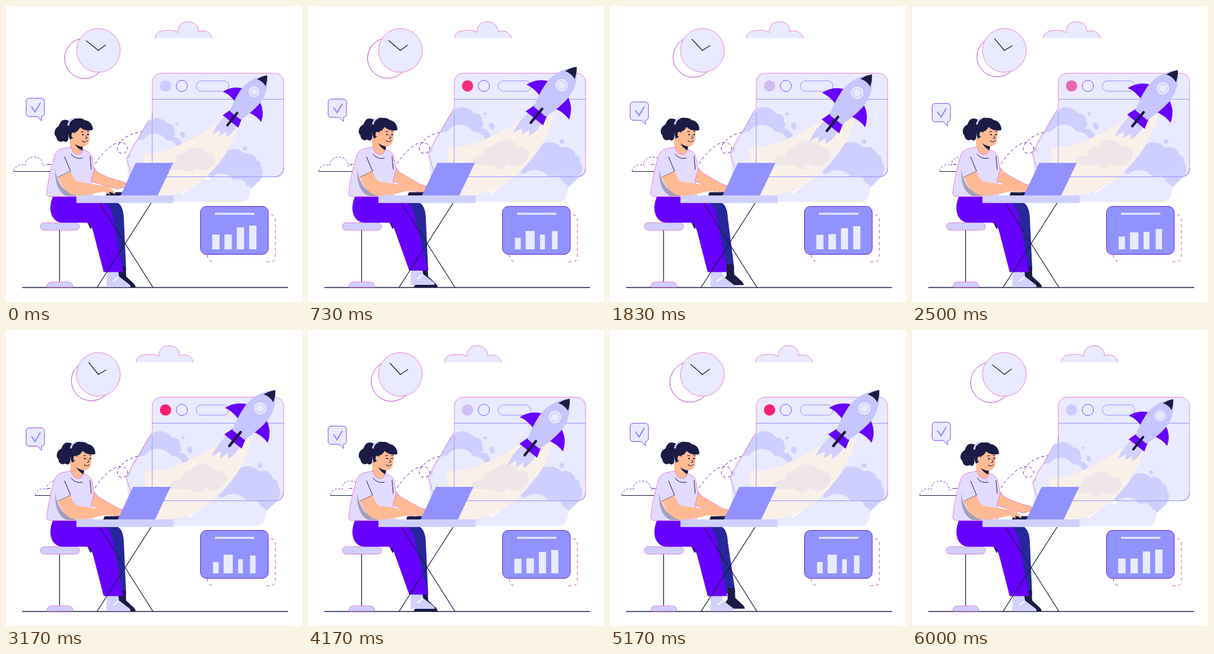
Animation, 500 px wide and 500 px high, one loop 6030 ms. Source, as an HTML page:

```html
<!DOCTYPE html>
<html lang="en">
<head>
<meta charset="utf-8">
<title>Launch day</title>
<style>
html, body { margin: 0; width: 100%; height: 100%; overflow: hidden; background: #fff; }
svg { display: block; width: 100vw; height: 100vh; }
.pale { fill: #e9e9ff; }
.lilac { fill: #cfcfff; }
.violet { fill: #6600ff; }
.navy { fill: #1b1b45; }
.skin { fill: #ffba93; }
.shirt { fill: #e3daff; }
.edge { stroke: #e868c4; stroke-width: .8; }
.line { fill: none; stroke: #9393ff; }
.ink { fill: none; stroke: #1b1b45; stroke-width: 1.3; stroke-linecap: round; stroke-linejoin: round; }
.thin { stroke-width: 1; }
.dash { fill: none; stroke: #6a1fb0; stroke-dasharray: 5 4; }
</style>
</head>
<body>
<svg viewBox="0 0 500 500">
  <defs>
    <path id="cloud" d="M0 28C0 20 6 15 18 15Q30 13 38 18C38 6 45 0 56 0C67 0 74 8 73 17C85 12 95 20 96 28"/>
    <path id="fin" class="violet" d="M20 48Q40 57 46.500 77Q33 73 15 78Z"/>
  </defs>

  <!-- sky -->
  <use id="skyCloud" href="#cloud" class="pale edge"/>
  <circle id="clockBack" r="34" fill="#fff" stroke="#b02ad0" stroke-width=".9"/>
  <circle cx="156" cy="75" r="37" class="pale edge"/>
  <path id="longHand" class="ink" d="M156 75L136 59"/>
  <path id="shortHand" class="ink" d="M156 75L168 66"/>
  <g id="bubble">
    <path class="pale" stroke="#8a3cf0" d="M40 0H59Q65 0 65 6V25Q65 30 60 31V38L53 31H40Q34 31 34 25V6Q34 0 40 0Z"/>
    <path d="M43 14L49 23L58 8" fill="none" stroke="#9292ff" stroke-width="2.2"/>
  </g>
  <g id="lowCloud">
    <use href="#cloud" transform="translate(82 0) scale(-.855 .86)" fill="#fff" stroke="#6a1fb0" stroke-dasharray="4 3"/>
    <path class="ink thin" d="M0 24.500H82"/>
  </g>
  <path class="dash" d="M70 267.500H150Q158 254 170 243C180 233 190 229 198 231C209 236 207 248 197 249C187 249 185 239 193 230C203 219 214 214 236 211"/>

  <!-- browser window, smoke and rocket -->
  <rect x="247" y="113.500" width="222" height="175" rx="15" class="pale edge"/>
  <path class="line" d="M247 157.500H469"/>
  <circle id="dot" cx="269.500" cy="135" r="9.500"/>
  <circle cx="297" cy="135" r="9.500" fill="none" stroke="#7a4cff"/>
  <rect class="line" x="321.500" y="126.500" width="55" height="17.500" rx="8.750"/>
  <g id="smoke">
    <path id="leftDark" class="lilac"/>
    <path id="leftPale" class="pale"/>
    <path class="edge" fill="none" d="M246 174L203 248L212 278"/>
    <circle class="lilac" cx="299" cy="182" r="2.600"/>
    <ellipse class="lilac" cx="310.500" cy="203" rx="4.300" ry="6" transform="rotate(-20 310.500 203)"/>
    <path id="rightDark" class="lilac"/>
    <path id="rightPale" class="pale"/>
    <circle class="lilac" cx="429" cy="229" r="4"/>
    <ellipse class="lilac" cx="455" cy="258" rx="4" ry="6" transform="rotate(-15 455 258)"/>
    <path fill="#f9f0ea" d="M234 238Q270 240 305 222Q345 204 370 183L416 184Q404 228 378 258Q350 294 312 312Q285 322 245 320Q238 280 234 238Z"/>
    <path id="haze" fill="#efe6e9"/>
  </g>
  <path class="line" d="M247 180V274Q247 288.500 261 288.500H455Q469 288.500 469 274"/>
  <g id="rocket">
    <path fill="#d3d0ff" d="M-14 110Q-18 135 -12 154L-5 138L1 148L6 133L12 141Q18 128 15 110Z"/>
    <path class="violet" d="M-14 96H14L19 112.500H-19Z"/>
    <use href="#fin"/>
    <use href="#fin" transform="scale(-1 1)"/>
    <path fill="#c6c5ff" d="M0 0C18 18 24 38 22 56Q20 78 13 98H-13Q-20 78 -22 56C-24 38 -18 18 0 0Z"/>
    <path class="navy" d="M0 0Q7 8 10.500 18Q0 14 -10.500 18Q-7 8 0 0Z"/>
    <circle class="pale" cy="40" r="10.500"/>
    <circle cy="40" r="7" fill="none" stroke="#b5b5f2" stroke-width="1.500" stroke-dasharray="2 1.500"/>
    <path d="M0 92V122" stroke="#1b1b45" stroke-width="4.500" stroke-linecap="round"/>
  </g>

  <!-- chart -->
  <path fill="none" stroke="#c93f95" stroke-dasharray="5 5" d="M340 420Q340 432 352 432M440 432H446Q455 432 455 423V361Q455 352.500 446 352.500H443"/>
  <rect x="328.500" y="338.500" width="114.500" height="81" rx="10" fill="#9292ff" stroke="#6a1fe0"/>
  <path d="M353 351H419.500" stroke="#e9e9ff" stroke-width="3"/>
  <g id="bars" class="pale"></g>

  <!-- stool and legs -->
  <path class="ink" d="M28 475.500H476M90.500 378V466"/>
  <path class="lilac edge" d="M69 475Q69 466 78 466H104Q113 466 113 475Z"/>
  <rect x="58" y="366" width="66" height="12.500" rx="6.200" class="lilac edge"/>
  <path class="navy" d="M137 365H149L143 377Z"/>
  <path id="backLeg" fill="#27279c"/>
  <path id="backShoe" class="navy" d="M190 440H202L203 457L216 469Q219 472 219 475H178L190 459Z"/>
  <g id="frontShoe">
    <path fill="#d3d1fb" d="M170 446H189L191 457L208 470Q211 472 210 475H169.500Z"/>
    <path d="M181 465L190 458" stroke="#fff" stroke-width="2"/>
  </g>
  <path id="frontLeg" class="violet"/>

  <!-- woman -->
  <path id="backArm" class="skin edge"/>
  <path class="skin" d="M108 222L130 236L131 248Q122 254 109 246Z"/>
  <path class="shirt edge" d="M72 321Q68 321 69 314C72 288 78 266 83 250Q88 241 100 240L110 238Q112 250 122 251Q129 251 130 242L139 246Q145 250 146 260L149 276L144 294L146 322H78Z"/>
  <path fill="#a39fbd" d="M83 275Q86 298 98 309L119 321H102Q82 312 83 275Z"/>
  <path class="ink thin" d="M99 255L109 279L88 289M110 250Q117 260 129 257M142 254L144 276"/>
  <path id="frontArm" class="skin"/>
  <g id="head">
    <path class="navy" d="M107 194C95 189 92 195 89 203C81 207 80 218 85 221C86 229 93 231 97 228C103 232 107 227 105 217Z"/>
    <path class="navy" d="M114 230L130 236L129 244Q121 242 114 230Z"/>
    <path class="skin" d="M108 207L109 228Q119 237 130 238Q140 236 141 225V204H112Z"/>
    <path class="navy" d="M104 207C103 195 112 189 121 190Q129 189 133 193C141 193 147 201 147 209Q135 213 125 205Q122 212 117 213L114 222L108 226Q104 216 104 207Z"/>
    <path d="M105 202Q106 193 114 190" fill="none" stroke="#d6d4ff" stroke-width="3"/>
    <ellipse class="skin" cx="113.500" cy="218" rx="3" ry="4.200"/>
    <path class="ink thin" d="M127 213L131 212M137 212H140M135 219L137 223L134 224M129 228Q134 232 138 227"/>
    <g id="eyes" class="navy"><circle cx="130" cy="217.500" r="1.400"/><circle cx="138.500" cy="217" r="1.400"/></g>
    <path id="lids" class="ink" d="M128 217.500H132M137 217H140"/>
  </g>

  <!-- table and laptop -->
  <path class="ink" d="M158 333L248 475M245 333L154 475"/>
  <g id="laptop">
    <path class="navy" d="M169 320L171 314.500H197V320Z"/>
    <path fill="#9292ff" d="M219 265H282.500L256 320.500H193Z"/>
  </g>
  <rect x="119" y="320" width="164" height="12.800" class="lilac"/>
  <path id="fingers" class="skin"/>
</svg>
<script>
const LOOP = 6030, BOUNCE = LOOP / 3, STEP = LOOP / 2;
const $ = id => document.getElementById(id);
const set = (id, name, value) => $(id).setAttribute(name, value);
const place = (id, value) => set(id, 'transform', value);
const ease = u => (1 - Math.cos(Math.PI * Math.min(1, Math.max(0, u)))) / 2;
const mix = (a, b, u) => a + (b - a) * u;

// Rises from 0 to 1 after `from`, holds, and is back at 0 by `to`
const pulse = (t, from, to, ramp) => ease(Math.min(t - from, to - t) / ramp);

// Outline of round lobes between key points, closed by a plain base
function puff(points, base = '') {
  let d = `M${points[0]}`;
  points.slice(1).forEach(([x, y], i) => {
    const r = .6 * Math.hypot(x - points[i][0], y - points[i][1]);
    d += `A${r} ${r} 0 0 1 ${x} ${y}`;
  });
  return d + base + 'Z';
}

set('leftDark', 'd', puff([[240, 182], [281, 182], [294, 195], [291, 207], [308, 227], [297, 246]], 'L300 331H212L203 248'));
set('leftPale', 'd', puff([[211, 244], [235, 212], [279, 213], [300, 238]], 'L310 331H214L203 250'));
set('rightDark', 'd', puff([[360, 282], [383, 246], [428, 239], [452, 256], [455, 292]], 'L438 308'));
set('rightPale', 'd', puff([[330, 302], [360, 290], [408, 290], [431, 299], [439, 312]], 'Q438 331 420 331H290'));
set('haze', 'd', puff([[274, 268], [297, 255], [312, 238], [355, 238], [373, 252], [336, 266], [312, 269]]));

const barHeights = [25, 25, 37, 40], barScales = [.76, 1.26, .64, .75];
const bars = barHeights.map((height, i) => {
  const el = document.createElementNS('http://www.w3.org/2000/svg', 'rect');
  el.setAttribute('x', -6.2);
  el.setAttribute('y', -height);
  el.setAttribute('width', 12.4);
  el.setAttribute('height', height);
  $('bars').append(el);
  return el;
});

function drawLegs(t) {
  const tap = pulse(t, 185, 1700, 520), lift = pulse(t, 1500, 2560, 530);
  const fx = 6 * tap, fy = -2.5 * tap, bx = 10 * lift, by = -5 * lift;
  place('frontShoe', `translate(${fx * .6} ${-4 * tap})`);
  place('backShoe', `translate(${bx} ${by})`);
  set('backLeg', 'd', `M150 332H188Q198 337 199 358L${203 + bx} ${447 + by}L${190 + bx * .3} ${450 + by}L170 360Z`);
  set('frontLeg', 'd', `M79 322Q72 340 77 353Q83 366 96 366H137Q143 368 147 380L${165 + fx} ${449.5 + fy}`
    + `H${198 + fx * .8}L182 362Q178 340 168 333V322Z`);
}

function drawArms(t, grow) {
  const tap = grow * Math.sin(t / LOOP * Math.PI * 30);
  const x = 185 + 7 * grow, y = 317 - 4 * grow + tap * .8, by = 301 + 6 * grow - tap * .6;
  set('backArm', 'd', `M148 272L155 281Q170 290 190 ${by - 6}L201 ${by - 3}L203 ${by + 4}L188 ${by + 8}L152 299L142 296Z`);
  set('frontArm', 'd', `M88 289L109 279Q114 294 121 297L160 ${303 - grow}L174 ${305 - 3 * grow}L${x} ${y}L166 ${313 + tap * .3}`
    + `L140 319Q124 322 110 318C98 311 93 302 88 289Z`);
  set('fingers', 'd', `M160 ${304 - grow}L174 ${305 - 3 * grow}L${x} ${y - 2}L${x - 1} ${y + 1}L172 ${311 - grow}L${x - 9} ${y + 2}L163 ${312 - grow}Z`);
}

function draw(t) {
  const sway = ease(2 * Math.min(t, LOOP - t) / LOOP);
  const up = pulse(t % BOUNCE, 0, BOUNCE, 900);
  const grow = pulse(t, 0, LOOP, 480), size = mix(.885, 1, grow);

  place('skyCloud', `translate(${252 - 32 * sway} 26.500)`);
  place('lowCloud', `translate(${13 + 36.5 * sway} 255)`);
  place('bubble', `translate(0 ${155.8 + 9.5 * sway})`);
  place('clockBack', `translate(${133 + 11.5 * sway} ${88.5 - 3 * sway})`);
  place('longHand', `rotate(${12.5 * sway} 156 75)`);
  place('shortHand', `rotate(${7 * sway} 156 75)`);
  place('laptop', `translate(${-4.5 * sway} 0)`);

  place('smoke', `translate(208 331) scale(${size}) translate(-208 -331)`);
  place('rocket', `translate(${441.2 + 13.8 * up} ${117 - 15.5 * up}) rotate(${38.5 + up}) scale(${size})`);
  set('dot', 'fill', `rgb(${mix(204, 255, up)} ${mix(203, 30, up)} ${mix(255, 112, up)})`);
  bars.forEach((el, i) =>
    el.setAttribute('transform', `translate(${354.5 + 20.8 * i} 411) scale(${mix(1, barScales[i], up)})`));

  const shut = Math.abs(t - 4170) < 90;
  place('head', `translate(${2.2 * grow} ${-grow}) rotate(${3.4 * grow} 121 240)`);
  set('eyes', 'visibility', shut ? 'hidden' : 'visible');
  set('lids', 'visibility', shut ? 'visible' : 'hidden');
  drawLegs(t % STEP);
  drawArms(t, grow);
}

const start = performance.now();
function tick() {
  draw((performance.now() - start) % LOOP);
  requestAnimationFrame(tick);
}
tick();
</script>
</body>
</html>
```
